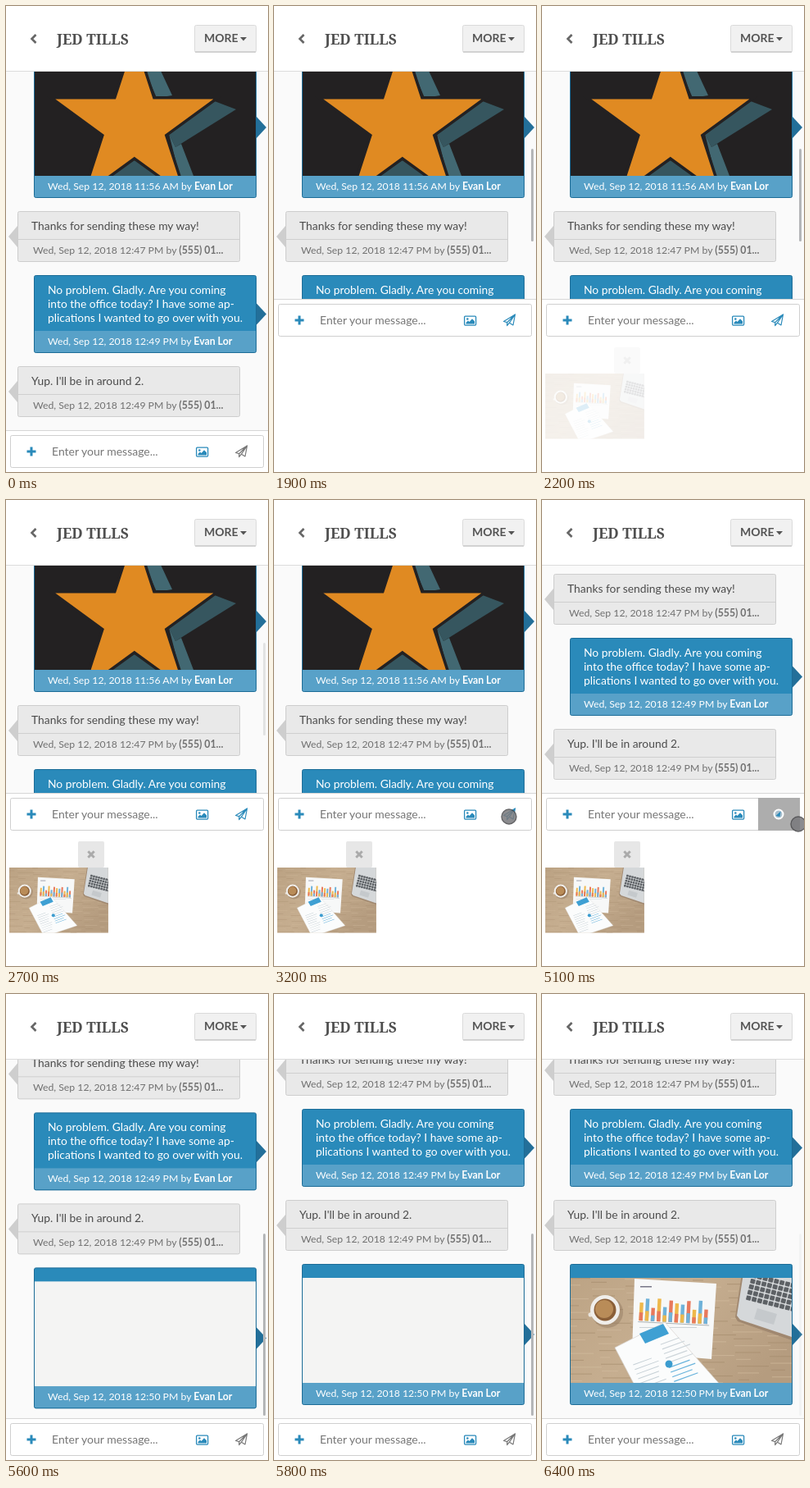
Write an HTML page that moves like this. It is 320x568 px and loops after 6500 ms.

```html
<!DOCTYPE html>
<html lang="en">
<head>
<meta charset="utf-8">
<title>Chat attachment</title>
<style>
  html, body { margin: 0; width: 100%; height: 100%; overflow: hidden; background: #fff; }
  svg { display: block; width: 100vw; height: 100vh; }
  text { font: 14px Lato, sans-serif; white-space: pre; }
  .body { font-size: 13.85px; }
  .meta { font-size: 12.25px; }
  .b { font-weight: 700; }
  .title { font: 700 17.5px "Noto Serif", serif; }
</style>
</head>
<body>
<script>
const LOOP = 6500, STEP = 100;
const BLUE = '#2a8aba';
const CALLER = '(555) 01...', AGENT = 'Evan Lor';

const rect = (x, y, w, h, fill, extra = '') =>
  `<rect x="${x}" y="${y}" width="${w}" height="${h}" fill="${fill}" ${extra}/>`;
const poly = (points, fill, extra = '') => `<polygon points="${points}" fill="${fill}" ${extra}/>`;
const text = (x, y, str, fill, cls = '') => `<text x="${x}" y="${y}" fill="${fill}" class="${cls}">${str}</text>`;
const meta = (x, y, time, who, fill) =>
  text(x, y, `Wed, Sep 12, 2018 ${time} by <tspan class="b">${who}</tspan>`, fill, 'meta');

// Message bubbles, positioned in list coordinates
function received(y, line, time) {
  return poly(`14,${y + 18} 3,${y + 31} 14,${y + 44}`, '#cecece') +
    rect(14.5, y + .5, 271, 61, '#e9e9e9', 'rx="2" stroke="#cdcdcd"') +
    rect(15, y + 34, 270, 1, '#cfcfcf') +
    text(31, y + 23, line, '#4c4c4c', 'body') +
    meta(33, y + 52, time, CALLER, '#707070');
}

function sent(y, h, time, content) {
  const mid = y + h / 2;
  return poly(`306,${mid - 13} 318,${mid} 306,${mid + 13}`, '#236f99') +
    rect(34.5, y + .5, 271, h - 1, BLUE, 'rx="2"') +
    content +
    rect(35, y + h - 27, 270, 26, '#58a1c8') +
    rect(34.5, y + .5, 271, h - 1, 'none', 'rx="2" stroke="#1c6c97"') +
    meta(51, y + h - 10, time, AGENT, '#fff');
}

function starPoints(cx, cy, r) {
  return Array.from({ length: 10 }, (_, i) => {
    const a = i * Math.PI / 5, d = i % 2 ? r * .382 : r;
    return `${(cx + d * Math.sin(a)).toFixed(1)},${(cy - d * Math.cos(a)).toFixed(1)}`;
  }).join(' ');
}

const star = `<g clip-path="url(#starClip)">
  ${rect(35, 79, 270, 128, '#232122')}
  ${poly('170,79 189,79 203,109 184,112', '#426872')}
  ${poly('252,115 281,126 207,172 199,156', '#36565f')}
  ${poly('199,156 207,172 214,168 229,207 212,207', '#426872')}
  ${poly('157,188 190,207 124,207', '#36565f')}
  ${poly(starPoints(156.8, 145, 101.5), '#e08a22', 'stroke="#232122" stroke-width="7" paint-order="stroke"')}
</g>`;

// Desk photo, 270 x 178
function desk() {
  let grain = '', bars = '', lines = '', keys = '';
  for (let i = 0; i < 150; i++) {
    grain += rect((i * 83) % 290 - 20, (i * 1.19).toFixed(1), 12 + (i * 37) % 34, 1.1,
      i % 2 ? '#a38a6c' : '#d3bd9f', 'opacity=".6"');
  }
  const colors = ['#eeb84b', '#6fb2d9', '#e8795c'];
  for (let i = 0; i < 12; i++) {
    const h = 14 + 14 * Math.abs(Math.sin(i * 1.35 + .6));
    bars += rect(i * 7.2, 31 - h, 4.4, h, colors[i % 3]) + rect(i * 7.2, 31 - h * .45, 4.4, h * .45, colors[(i + 2) % 3]);
  }
  for (let i = 0; i < 9; i++) {
    lines += rect(6, 22 + i * 6, 24 + (i * 7) % 9, 1, '#c6d0d6') +
      rect(46, 10 + i * 6, 24 + (i * 5) % 11, 1.2, i > 4 ? '#68b3dc' : '#cdd5da');
  }
  for (let row = 0; row < 5; row++)
    for (let k = 0; k < 9; k++) keys += rect(k * 7, row * 7, 5.8, 5.6, '#5d6165', 'rx="1"');
  return rect(0, 0, 270, 178, 'url(#wood)') + grain +
    poly('212,0 270,0 270,101 204,78 201,73', '#a08870') +
    poly('214,0 270,0 270,97 207,76 203,71', '#d5d8da') +
    `<g transform="translate(222 19) rotate(14)">${keys}</g>` +
    poly('228,62 252,69 248,82 224,75', '#c5c9cc') +
    poly('78,26 178,32 172,124 75,116', '#f7f8f8') +
    rect(85, 35, 14, 1.5, '#778') +
    `<g transform="translate(85 46) rotate(3)">${bars}${rect(-1, 32, 87, 1, '#aab2b6')}</g>` +
    rect(84, 85, 70, 1, '#ccd2d6') +
    poly('54,110 115,79 185,158 95,188', '#fbfcfc', 'stroke="#d8d5d0" stroke-width=".7"') +
    poly('84,93 113,81 120,93 91,105', '#3fa0d3') +
    `<g transform="translate(63 112) rotate(-20)">${lines}</g>
    <circle cx="120" cy="130" r="4.5" fill="#3b9ccf"/>
    <circle cx="45" cy="67" r="19" fill="#8e755d" opacity=".45"/>
    <path d="M24 70L31 68" stroke="#e9e5de" stroke-width="5" stroke-linecap="round"/>
    <circle cx="42" cy="64" r="18" fill="#f0eeea"/>
    <circle cx="42" cy="64" r="13.5" fill="#8a5f38"/>
    <circle cx="41" cy="63" r="11" fill="#b98c58"/>`;
}

const lines = ['No problem. Gladly. Are you coming', 'into the office today? I have some ap-',
  'plications I wanted to go over with you.'];

const plane = `<path d="M-7 1.5L7 -7L4.5 6L0 3.2L-2.8 6.5L-2.8 2.7Z M-2.8 2.7L7 -7L0 3.2"
  fill="none" stroke-width="1.2" stroke-linejoin="round"/>`;

document.body.innerHTML = `<svg viewBox="0 0 320 568" preserveAspectRatio="none">
<defs>
  <linearGradient id="wood" x2="1" y2=".6">
    <stop stop-color="#bba283"/><stop offset=".5" stop-color="#c6ae90"/><stop offset="1" stop-color="#b59c7f"/>
  </linearGradient>
  <clipPath id="listClip">${rect(0, 80, 320, 438, '#000')}</clipPath>
  <clipPath id="starClip">${rect(35, 79, 270, 128, '#000')}</clipPath>
  <clipPath id="photoClip">${rect(35, 534, 270, 128, '#000')}</clipPath>
  <clipPath id="deskClip">${rect(0, 0, 270, 178, '#000')}</clipPath>
  <g id="desk" clip-path="url(#deskClip)">${desk()}</g>
</defs>
${rect(0, 0, 320, 568, '#fafafa')}
<g clip-path="url(#listClip)"><g id="list">
  ${sent(62, 172, '11:56 AM', star)}
  ${received(250, 'Thanks for sending these my way!', '12:47 PM')}
  ${sent(328, 95, '12:49 PM', lines.map((s, i) => text(51, 351 + 17 * i, s, '#fff', 'body')).join(''))}
  ${received(439, "Yup. I'll be in around 2.", '12:49 PM')}
  <g id="reply">${sent(517, 172, '12:50 PM', rect(35, 534, 270, 128, '#f4f4f3') +
    '<g clip-path="url(#photoClip)"><use id="photo" href="#desk" x="35" y="509"/></g>')}</g>
</g></g>
<rect id="bar" x="314" width="3" rx="1.5" fill="#b4b6b8"/>
${rect(0, 0, 320, 80, '#fff')}${rect(0, 79, 320, 1, '#dcdcdc')}
<path d="M36.5 35L31.5 40L36.5 45" fill="none" stroke="#666" stroke-width="2.6"/>
${text(62, 46.5, 'JED TILLS', '#4f4f4f', 'title')}
${rect(230.5, 23.5, 75, 33, '#f1f1f1', 'rx="2" stroke="#dadada"')}
${rect(231, 55, 74, 2, '#d2d2d2')}
${text(242, 44, 'MORE', '#555', 'b')}
${poly('286,38 294,38 290,42.5', '#555')}
<g id="footer">
  ${rect(0, 357, 320, 220, '#fff')}${rect(0, 357, 320, 1, '#d6d6d6')}
  ${rect(5.5, 363.5, 309, 39, '#fff', 'rx="2" stroke="#cfcfcf"')}
  <path d="M25.5 383H36.5M31 377.5V388.5" stroke="${BLUE}" stroke-width="3"/>
  ${text(56, 388, 'Enter your message...', '#777')}
  ${rect(232.6, 378.1, 14, 11, '#fff', `rx="1" stroke="${BLUE}" stroke-width="1.3"`)}
  <circle cx="236.3" cy="381.5" r="1.3" fill="${BLUE}"/>
  ${poly('234.5,387.5 234.5,386 237,383.6 238.6,385 242,381.2 245,384.3 245,387.5', BLUE)}
  <g id="busy">${rect(264, 363, 51, 40, '#adadad')}
    <circle cx="289" cy="383" r="5.5" fill="#a9c0cf" stroke="#fff" stroke-width="2"/>
    <path d="M285.5 385L291.5 379.5L290.5 386Z" fill="${BLUE}"/></g>
  <g id="send" transform="translate(287.5 383)">${plane}</g>
</g>
<g id="thumb">
  ${rect(88, 416, 32, 32, '#e7e7e7', 'rx="2"')}
  <path d="M100.3 428.3L107.7 435.7M107.7 428.3L100.3 435.7" stroke="#aaa" stroke-width="3"/>
  <use href="#desk" transform="translate(4 448) scale(.448)"/>
</g>
<circle id="cursor" r="9" fill="#79797c" stroke="#4a4a4d" stroke-width="1.4" opacity=".85"/>
<rect id="progress" height="2" fill="${BLUE}"/>
</svg>`;

const el = id => document.getElementById(id);
const set = (id, attrs) => { for (const k in attrs) el(id).setAttribute(k, attrs[k]); };
const show = (id, on) => set(id, { visibility: on ? 'visible' : 'hidden' });
const ramp = (t, a, b) => Math.min(1, Math.max(0, (t - a) / (b - a)));
const ease = p => p * p * (3 - 2 * p);
const mix = (a, b, p) => a + (b - a) * p;

// Scrollbar: shows with each layout change or scroll, then fades
function barOpacity(t) {
  if (t >= 5400) return 1 - .9 * ramp(t, 6000, 6400);
  if (t > 3200) return 1 - ramp(t, 3600, 3900);
  return t < 1900 ? 0 : 1 - ramp(t, 2500, 2800);
}

function draw(t) {
  const open = t >= 1900 && t < 5400;
  const replied = t >= 5400;
  const busy = t >= 3400 && t < 5400;

  const up = ease(ramp(t, 3200, 3700));
  const scroll = replied ? mix(160, 188, ease(ramp(t, 5300, 5700))) : 160 * up;
  set('list', { transform: `translate(0 ${-scroll})` });
  set('footer', { transform: `translate(0 ${open ? 0 : 160})` });
  show('reply', replied);
  set('photo', { opacity: ramp(t, 6000, 6300) });
  set('bar', { y: replied ? 292 : mix(174, 241, up), height: replied ? 222 : 113, opacity: barOpacity(t) });

  show('thumb', open);
  set('thumb', { opacity: ramp(t, 2100, 2700) });
  show('busy', busy);
  show('send', !busy);
  set('send', { stroke: open ? BLUE : '#777' });

  const near = ease(ramp(t, 2700, 3100)), away = ease(ramp(t, 3400, 3800));
  show('cursor', t >= 2800 && open);
  set('cursor', { cx: mix(mix(306, 287, near), 313, away), cy: mix(mix(450, 386, near), 395, away) });

  const width = mix(276 * ramp(t, 3200, 3900), 320, ramp(t, 3900, 4200));
  set('progress', { width, opacity: 1 - ramp(t, 4200, 4600) });
}

const start = performance.now();
function tick() {
  const t = (performance.now() - start) % LOOP;
  draw(Math.floor(t / STEP) * STEP);
  requestAnimationFrame(tick);
}
tick();
</script>
</body>
</html>
```
